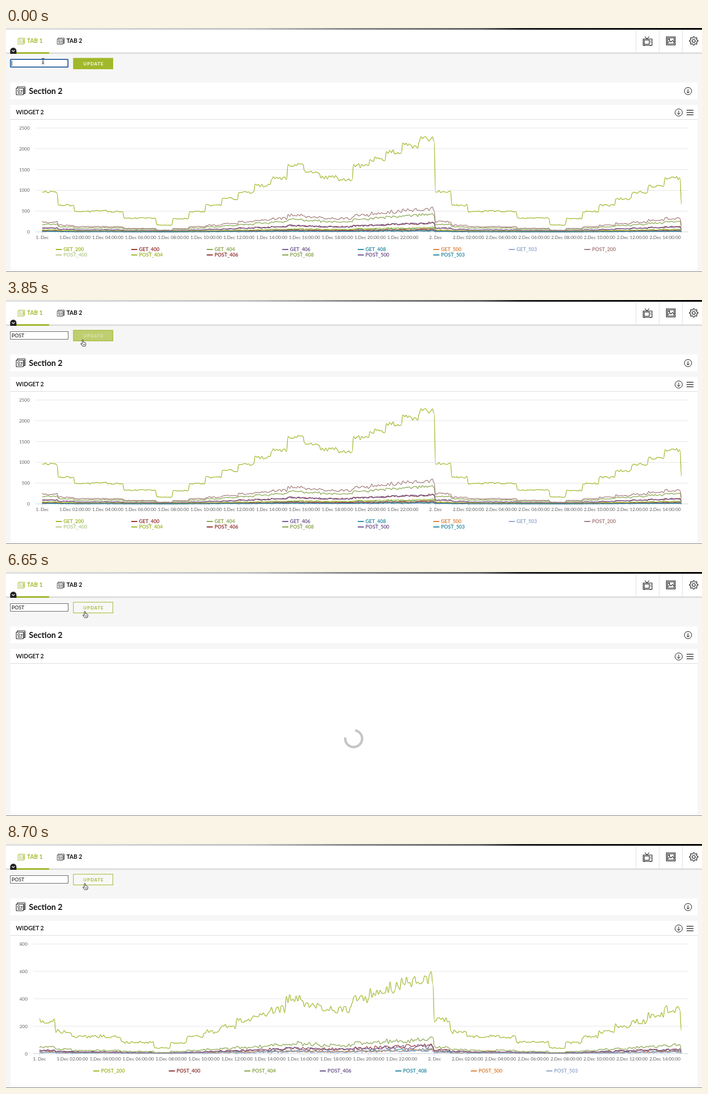
Write an HTML page that moves like this. It is 1260x444 px and loops after 8.9 s.

```html
<!DOCTYPE html>
<html lang="en">
<head>
<meta charset="utf-8">
<title>Dashboard filter</title>
<style>
  html, body { margin: 0; width: 100%; height: 100%; overflow: hidden; background: #f6f6f6; }
  svg { display: block; font-family: Lato, sans-serif; }
  .b { font-weight: 700; }
  .icon { fill: none; stroke: #1a1a1a; }
  .axis { font-size: 8.3px; fill: #606060; }
  .legend { font-size: 9px; font-weight: 700; }
</style>
</head>
<body>
<svg width="1260" height="444" viewBox="0 0 1260 444">
  <defs>
    <linearGradient id="photo">
      <stop offset="0" stop-color="#e2e2e2"/><stop offset=".35" stop-color="#c4c4c4"/>
      <stop offset=".5" stop-color="#8c8c8c"/><stop offset=".68" stop-color="#666"/>
      <stop offset=".74" stop-color="#222"/><stop offset="1" stop-color="#0c0c0c"/>
    </linearGradient>
    <clipPath id="reveal"><rect id="wipe" x="49" y="170" height="230"/></clipPath>
    <g id="news" fill="none">
      <path d="M.5 3.5h13v12h-13zM2.5 3.5V1h14v12.500h-3M15 3v10M9 7.500h3M9 9.500h3M3 12.500h8.500"/>
      <circle cx="5.200" cy="8.300" r="2"/>
    </g>
    <g id="down" class="icon"><circle r="6.600"/><path d="M0-3.500V3.500M-2.800 .8L0 3.500L2.800 .8"/></g>
  </defs>

  <rect width="1260" height="444" fill="#f6f6f6"/>
  <rect width="1260" height="3.500" fill="url(#photo)"/>
  <rect y="3.500" width="1260" height="41" fill="#fff"/>
  <rect y="44.500" width="1260" height="2.500" fill="#dadada"/>
  <path d="M1140.500 3.500v41M1182.500 3.500v41M1224.500 3.500v41" stroke="#e2e2e2"/>

  <rect x="14" y="44" width="64" height="3" fill="#a1b82b"/>
  <path d="M7.500 47V41.500a5.700 5.700 0 0 1 11.400 0V47z" fill="#222"/>
  <path d="M10.500 40.500l2.700 2.500 2.700-2.500" fill="none" stroke="#fff" stroke-width="1.100"/>
  <use href="#news" transform="translate(21 17.500) scale(.78)" stroke="#a1b82b"/>
  <text class="b" x="38" y="27.300" font-size="10.500" fill="#a1b82b">TAB 1</text>
  <use href="#news" transform="translate(92.500 17.500) scale(.78)" stroke="#1a1a1a"/>
  <text class="b" x="109.500" y="27.300" font-size="10.500" fill="#111">TAB 2</text>

  <g class="icon" stroke-width="1.100">
    <path d="M1153.500 20h16v11.500h-16zM1155.500 22h9v7.500h-9zM1166.500 23h1.500M1166.500 25.500h1.500M1156.500 15.500l4 4.500 4-4.500M1156 31.500v1.500M1167 31.500v1.500"/>
    <path d="M1195.500 16h16v15h-16zM1197.500 18h12v11h-12zM1198 27l3.500-4 2.500 2.500 2.500-3 3 3.500"/>
    <circle cx="1200.500" cy="20.500" r="1"/>
    <circle cx="1245" cy="23.500" r="2.800"/>
    <path id="gear"/>
  </g>

  <rect id="field" fill="#fff"/>
  <text id="typed" x="10.300" y="67.700" font-size="9" fill="#111"></text>
  <rect id="caret" y="59.500" width=".9" height="9.500" fill="#111"/>
  <rect id="button" x="122" y="55" width="71.500" height="19.500" stroke="#a1b82b"/>
  <text id="label" class="b" x="140" y="67.600" font-size="8" letter-spacing="1">UPDATE</text>

  <rect x="8" y="99" width="1244" height="30.500" fill="#fff"/>
  <use href="#news" x="18" y="106" stroke="#1a1a1a"/>
  <text class="b" x="41.500" y="119.800" font-size="14.600" fill="#111">Section 2</text>
  <use href="#down" x="1234.700" y="114.800"/>

  <rect x="8" y="140" width="1244" height="300" fill="#fff"/>
  <path d="M8 166.500H1252" stroke="#dcdcdc"/>
  <path d="M0 443.500H1260" stroke="#8a8a8a"/>
  <text class="b" x="18" y="157" font-size="10.500" fill="#222">WIDGET 2</text>
  <use href="#down" x="1217.800" y="153.800"/>
  <path d="M1232 149.700h12.500M1232 153.800h12.500M1232 157.900h12.500" stroke="#1a1a1a" stroke-width="1.300"/>

  <g id="all"></g>
  <g id="filtered"></g>
  <path id="spinner" d="M11-11A15.300 15.300 0 1 1-11-11" fill="none" stroke="#c5c5c5" stroke-width="4.400"/>

  <g id="cursor" stroke-linejoin="round">
    <path id="beam" d="M-2.500-5Q0-5 0-3.500Q0-5 2.500-5M0-3.500V4M-2.500 5.300Q0 5.300 0 4Q0 5.300 2.500 5.300M-1.300 2h2.600" fill="none" stroke="#222" stroke-width=".9"/>
    <path id="arrow" d="M0 0V10L2.300 8L4 11.500L5.500 10.800L4 7.500H7z" fill="#111" stroke="#fff" stroke-width=".7"/>
    <path id="hand" d="M-1 6V1Q-1 0 0 0T1 1V4.300L4 5Q5.500 5.300 5.500 7V9L4.500 11.500H-.5L-3.300 7.800Q-4 6.300-2.800 6.300L-1 8ZM1.500 7.500v2M3.300 7.500v2" fill="#fff" stroke="#222" stroke-width=".9"/>
  </g>
</svg>

<script>
const LOOP = 8900;
const $ = id => document.getElementById(id);
const set = (id, attrs) => { for (const k in attrs) $(id).setAttribute(k, attrs[k]); };
const show = (id, on) => set(id, { visibility: on ? 'visible' : 'hidden' });
const ramp = (t, start, length) => Math.min(1, Math.max(0, (t - start) / length));
const ease = p => .5 - Math.cos(p * Math.PI) / 2;

// Requests per hour of the day; every series is a noisy share of this.
const hourly = [965, 645, 490, 505, 488, 330, 335, 165, 320, 490, 640, 800,
  955, 1115, 1290, 1600, 1445, 1310, 1265, 1600, 1755, 1930, 2080, 2225];
const colors = ['#a1b82b', '#963a38', '#89a54e', '#71588f', '#2f8da8', '#db843d', '#93a9cf', '#a47d7c', '#b9cd96'];
const codes = [200, 400, 404, 406, 408, 500, 503];
const series = (verb, shares, noise, seed) =>
  codes.map((code, i) => ({ name: verb + '_' + code, share: shares[i], noise: noise[i], seed: seed + i }));
const gets = series('GET', [1, .095, .188, .094, .035, .03, .022],
  [.035, .14, .07, .1, .2, .25, .3], 1);
const posts = series('POST', [.25, .025, .047, .023, .012, .011, .009],
  [.09, .3, .2, .3, .4, .4, .5], 8);

function random(seed) {
  let s = seed * 7919;
  return () => (s = (s * 16807 + 11) % 2147483647) / 2147483647;
}

function curve({ share, noise, seed }, x0, hourWidth, y0, scale) {
  const rnd = random(seed);
  for (let i = 0; i < 8; i++) rnd();
  let d = '', px, py;
  for (let i = 0; i <= 390; i++) {
    const base = i < 390 ? hourly[Math.floor(i / 10) % 24] : 645;
    const x = x0 + i / 10 * hourWidth;
    const y = y0 - base * share * (1 + noise * (rnd() * 2 - 1)) * scale;
    const mid = (px + x) / 2;
    d += i ? `C${[mid, py, mid, y, x, y].map(v => v.toFixed(1))}` : `M${x} ${y.toFixed(1)}`;
    px = x; py = y;
  }
  return d;
}

function chart(id, list, o) {
  const scale = (o.bottom - 182) / o.max;
  const hourWidth = (o.midnight - o.x) / 24;
  let out = '';
  for (let v = 0; v <= o.max; v += o.step) {
    const y = o.bottom - v * scale;
    out += `<path d="M${o.left} ${y}H1235" stroke="${v ? '#e6e6e6' : '#c8d2dc'}"/>
      <text class="axis" x="${o.left - 10}" y="${y + 3}" text-anchor="end">${v}</text>`;
  }
  for (let h = 0; h < 40; h += 2) {
    const day = h < 24 ? 1 : 2, hour = String(h % 24).padStart(2, '0'), x = o.x + h * hourWidth;
    const label = h % 24 ? `${day}.Dec ${hour}:00:00` : `${day}. Dec`;
    out += `<path d="M${x} ${o.bottom}v3" stroke="#c8d2dc"/>
      <text class="axis" x="${x}" y="${o.bottom + 12.5}" text-anchor="middle">${label}</text>`;
  }
  let lines = '';
  list.forEach((s, i) => {
    const color = colors[i % 9];
    const x = o.legendX + i % 8 * 136.7, y = o.legendY + Math.floor(i / 8) * 10;
    lines += `<path d="${curve(s, o.x, hourWidth, o.bottom, scale)}" stroke="${color}"/>`;
    out += `<path d="M${x} ${y}h11" stroke="${color}" stroke-width="2"/>
      <text class="legend" x="${x + 14}" y="${y + 3.2}" fill="${color}">${s.name}</text>`;
  });
  $(id).innerHTML = out + `<g fill="none" stroke-width="1.3" ${o.clip || ''}>${lines}</g>`;
}

chart('all', [...gets, ...posts],
  { max: 2500, step: 500, bottom: 371, left: 53, x: 65.5, midnight: 777.8, legendX: 90, legendY: 403 });
chart('filtered', posts,
  { max: 800, step: 200, bottom: 381.5, left: 49, x: 60.5, midnight: 775.7, legendX: 158, legendY: 413,
    clip: 'clip-path="url(#reveal)"' });

let gear = '';
for (let i = 0; i < 32; i++) {
  const r = i % 4 < 2 ? 7.7 : 5.8, a = (i - .5) * Math.PI / 16;
  gear += (i ? 'L' : 'M') + (1245 + r * Math.cos(a)).toFixed(1) + ' ' + (23.5 + r * Math.sin(a)).toFixed(1);
}
set('gear', { d: gear + 'Z' });

// time, x, y
const path = [[0, 67, 60], [150, 67, 60], [2000, 79, 60], [2050, 80, 60], [2250, 98, 62], [2450, 126, 65],
  [2700, 138, 65], [3100, 138, 65], [3350, 139, 72.5], [3850, 139, 72.5], [4050, 142.7, 71.5], [LOOP, 142.7, 71.5]];
const keys = [150, 850, 1100, 1400];
const caretX = [10.2, 16.5, 23, 28.2, 33.4];

function pointer(t) {
  const i = path.findIndex(p => p[0] > t), [t0, x0, y0] = path[i - 1], [t1, x1, y1] = path[i];
  const p = (t - t0) / (t1 - t0);
  return [x0 + (x1 - x0) * p, y0 + (y1 - y0) * p];
}

function mix(a, b, p) {
  return `rgb(${a.map((v, i) => Math.round(v + (b[i] - v) * p))})`;
}

function draw(t) {
  const typed = keys.filter(k => t >= k).length;
  const focus = t < 3250;
  $('typed').textContent = 'POST'.slice(0, typed);
  const sinceKey = t - (typed ? keys[typed - 1] : 0);
  set('caret', { x: caretX[typed] });
  show('caret', focus && sinceKey % 1000 < 500);
  set('field', focus
    ? { x: 8.2, y: 57.2, width: 104, height: 14, rx: 1, stroke: '#1f5a9a', 'stroke-width': 1.8 }
    : { x: 8, y: 57.5, width: 104.5, height: 14, rx: 0, stroke: '#6a6a6a', 'stroke-width': 1 });

  const hover = ramp(t, 2450, 250) - ramp(t, 3250, 200) + ramp(t, 3750, 300);
  const green = [161, 184, 43];
  set('button', { fill: mix(green, [248, 248, 248], hover), stroke: mix(green, green, 0) });
  set('label', { fill: mix([255, 255, 255], green, hover) });

  const [x, y] = pointer(t);
  const shown = t < 150 || t >= 2050;
  set('cursor', { transform: `translate(${x} ${y})` });
  show('beam', shown && x < 112);
  show('arrow', shown && x >= 112 && x < 122);
  show('hand', shown && x >= 122);

  show('all', t < 4300);
  show('spinner', t >= 4300 && t < 7800);
  set('spinner', { transform: `translate(629.6 303.500) rotate(${40 + (t - 5200) * .4437})` });
  show('filtered', t >= 7800);
  set('wipe', { width: 1186 * ease(ramp(t, 7800, 900)) });
}

function tick() {
  draw(performance.now() % LOOP);
  requestAnimationFrame(tick);
}
tick();
</script>
</body>
</html>
```
